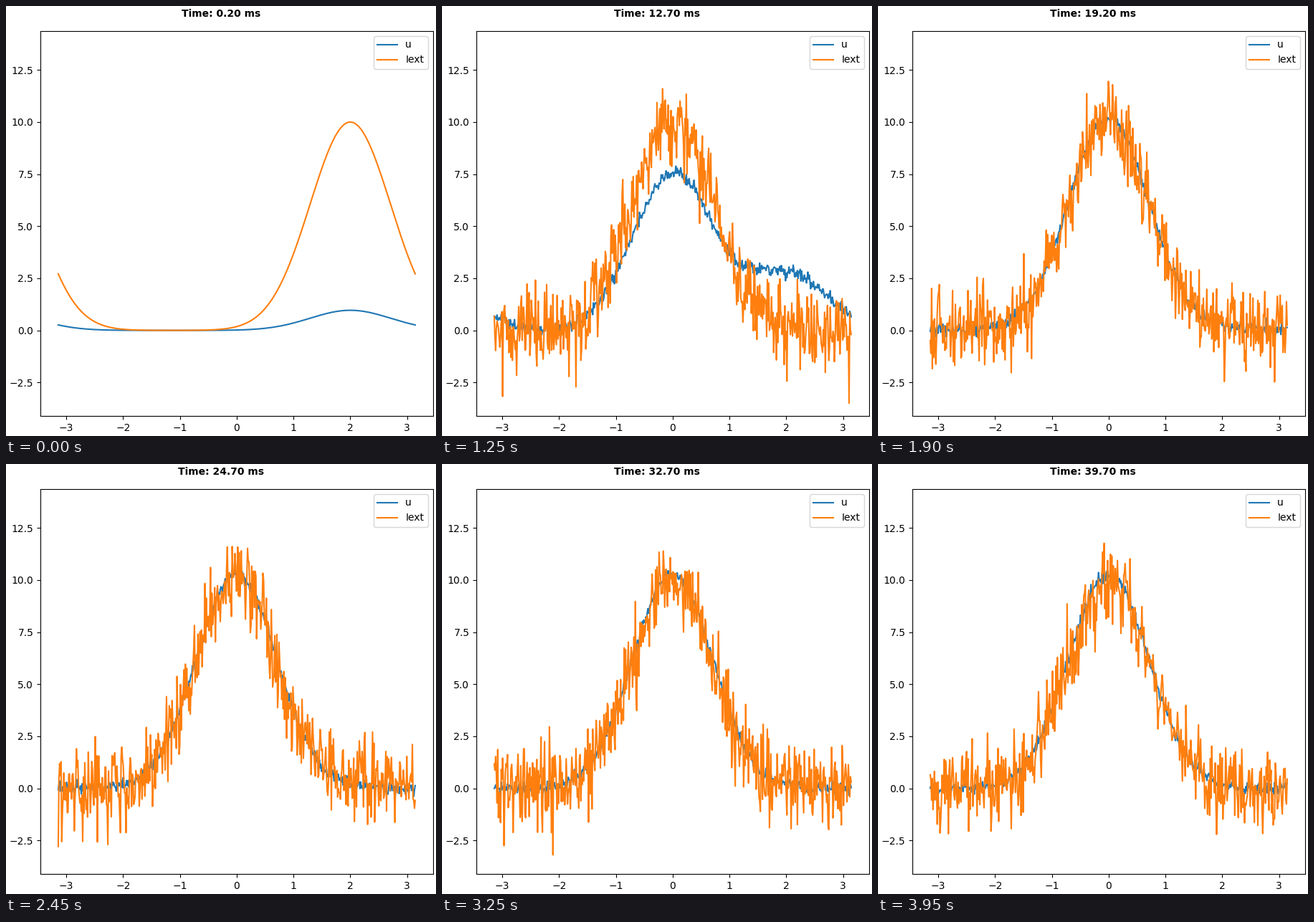
These frames come from a looping animation (600 by 600 pixels, 4 s). A matplotlib script:

```python
import numpy as np
import matplotlib.pyplot as plt
from matplotlib.animation import FuncAnimation

plt.rcParams["font.family"] = "DejaVu Sans"

# Continuous attractor network on a ring
N, TAU, K, A_WIDTH, AMP, J0 = 512, 2.0, 8.1, 0.5, 10.0, 4.0
DT, SWITCH, STEPS = 0.1, 100, 400
FRAMES, STRIDE = 80, 5

x = np.linspace(-np.pi, np.pi, N)


def ring_dist(d):
    return (d + np.pi) % (2 * np.pi) - np.pi


def stimulus(pos):
    return AMP * np.exp(-0.25 * (ring_dist(x - pos) / A_WIDTH) ** 2)


def simulate(inputs):
    d = ring_dist(x[:, None] - x[None, :])
    conn = J0 * np.exp(-0.5 * (d / A_WIDTH) ** 2) / (np.sqrt(2 * np.pi) * A_WIDTH)
    decay = np.exp(-DT / TAU)
    u = np.zeros(N)
    history = []
    for ext in inputs:
        rate = u**2 / (1 + K * np.sum(u**2))
        u = u * decay + (conn @ rate + ext) * (1 - decay)
        history.append(u)
    return history


rng = np.random.default_rng(7)
i_ext = np.empty((STEPS, N))
i_ext[:SWITCH] = stimulus(2.0)
i_ext[SWITCH:] = stimulus(0.0) + 0.1 * AMP * rng.standard_normal((STEPS - SWITCH, N))
u_hist = simulate(i_ext)

SIZE = 600
LEFT, RIGHT, BOTTOM, TOP = 48.0, 595.83, 28.0, 565.0
PAD = 3 / 72 * 100  # layout padding in pixels

fig = plt.figure(figsize=(6, 6), dpi=100)
ax = fig.add_axes([LEFT / SIZE, BOTTOM / SIZE,
                   (RIGHT - LEFT) / SIZE, (TOP - BOTTOM) / SIZE])
line_u, = ax.plot(x, u_hist[1], label="u")
line_ext, = ax.plot(x, i_ext[1], label="Iext")
ax.set_xlim(-1.1 * np.pi, 1.1 * np.pi)
ax.set_ylim(-4.106, 14.367)
ax.set_xticks(range(-3, 4))
ax.set_yticks(np.arange(-2.5, 13, 2.5))
ax.legend(loc="upper right")
title = fig.text(0.5, 1 - PAD / SIZE, "", ha="center", va="top",
                 fontsize=10, fontweight="bold")


def update(i):
    step = 1 + STRIDE * i
    line_u.set_ydata(u_hist[step])
    line_ext.set_ydata(i_ext[step])
    title.set_text(f"Time: {(step + 1) * DT:.2f} ms")
    return line_u, line_ext, title


anim = FuncAnimation(fig, update, frames=FRAMES, interval=50,
                     repeat=True, repeat_delay=0, blit=False)
plt.show()
```
